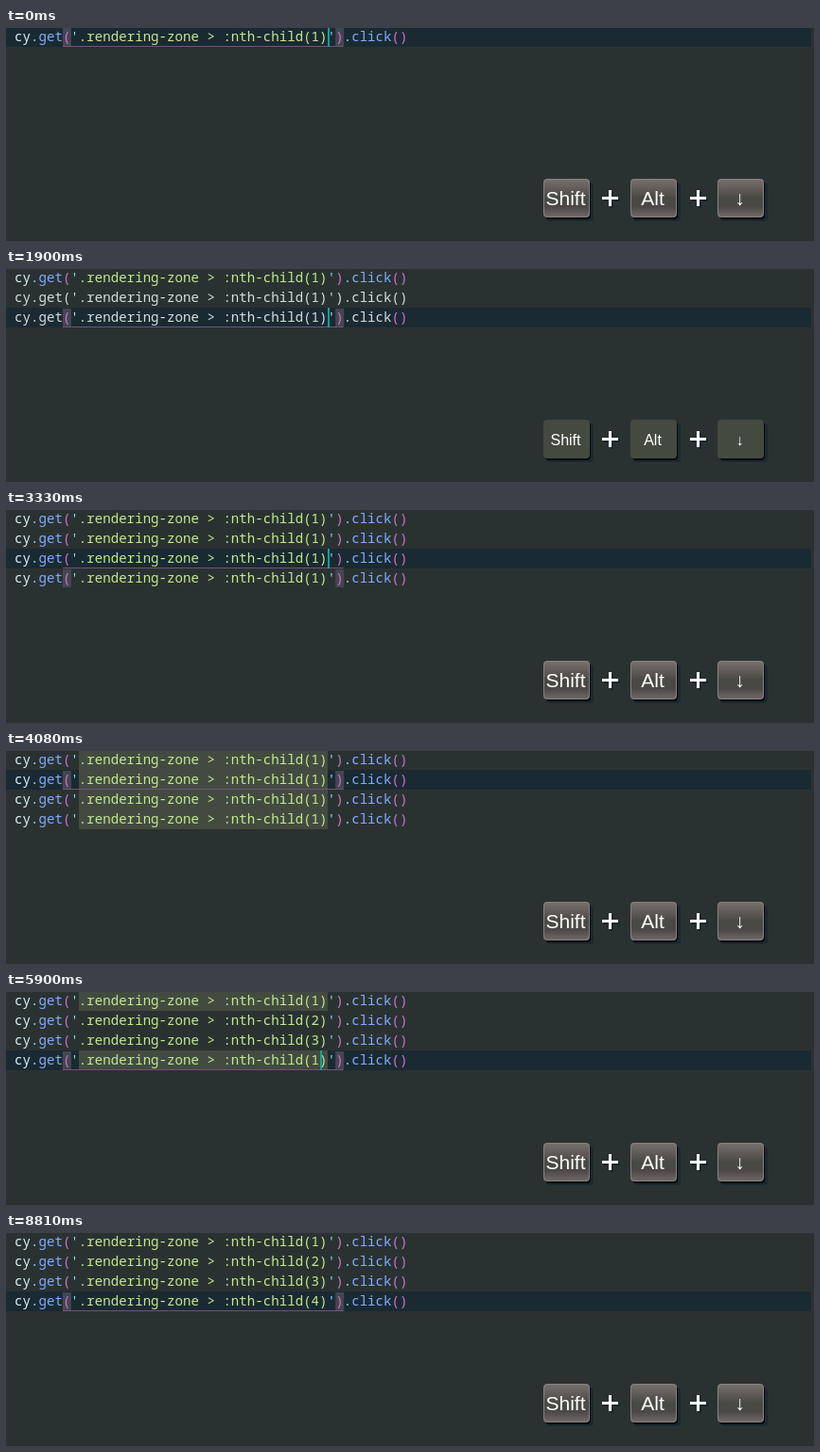
An HTML page with a canvas that plays this animation: 854 px wide and 226 px high, repeating every 9.34 s.

```html
<!DOCTYPE html>
<html lang="en">
<head>
<meta charset="utf-8">
<title>Copy line down</title>
<style>
  html, body { margin: 0; width: 100%; height: 100%; overflow: hidden; background: #2a3231; }
  canvas { display: block; }
</style>
</head>
<body>
<canvas id="stage" width="854" height="226"></canvas>
<script>
const ctx = document.getElementById('stage').getContext('2d');
const LOOP = 9340, LEFT = 9, CHAR = 8.48, ROW = 21;
const PLAIN = '#d3dee0', PINK = '#d16fd0';

// Each step changes part of the editor state.
const steps = [
  [0, { digits: ['1'], row: 0, col: 39, caret: true, match: 0, guide: 0,
        marks: [], plainFrom: 9, shift: false, alt: false, down: false }],
  [430, { shift: true, caret: false }],
  [530, { alt: true }],
  [890, { caret: true }],
  ...copyDown(1290, 1, 1480),
  ...copyDown(1870, 2, 1960),
  ...copyDown(2190, 3, 2340),
  [2500, { shift: false }],
  [2600, { alt: false }],
  [2700, { caret: false }],
  [2900, { caret: true }],
  [3330, { row: 2, guide: 2 }],
  [3360, { match: 2 }],
  [3580, { row: 1, guide: 1 }],
  [3610, { match: 1 }],
  [3980, { col: 38 }],
  [4080, { marks: [0, 1, 2, 3], caret: false }],
  ...retype(4380, 4580, ['1', '2', '1', '1'], 1),
  [4880, { row: 2 }],
  [4910, { match: 2, guide: 2 }],
  [5030, { marks: [0, 2, 3] }],
  ...retype(5160, 5390, ['1', '2', '3', '1'], 2),
  [5750, { row: 3 }],
  [5780, { match: 3, guide: 3 }],
  [5900, { marks: [0, 3] }],
  ...retype(6060, 6260, ['1', '2', '3', '4'], 3),
  ...[6760, 7290, 7520, 8050, 8810].map((t, i) => [t, { caret: i % 2 === 1 }])
];

function copyDown(t, row, release) {
  return [
    [t, { down: true, digits: Array(row + 1).fill('1'), row, guide: row, plainFrom: row - 1 }],
    [t + 30, { match: row }],
    [t + 60, { plainFrom: 9 }],
    [release, { down: false }]
  ];
}

function retype(erase, type, digits, row) {
  const erased = digits.map((d, i) => i === row ? '' : d);
  return [
    [erase, { digits: erased, col: 37, marks: [], caret: true }],
    [type, { digits, col: 38 }]
  ];
}

const colX = col => LEFT + col * CHAR;

function rect(color, x, y, w, h) {
  ctx.fillStyle = color;
  ctx.fillRect(x, y, w, h);
}

function drawCode(digit, row, plain, brackets) {
  const tokens = [
    ['cy', '#d9f1f5'], ['.', '#89ddff'], ['get', '#82aaff'], ['(', PINK], ["'", '#89ddff'],
    [`.rendering-zone > :nth-child(${digit})`, '#c3e88d'], ["'", '#89ddff'], [')', PINK],
    ['.', '#89ddff'], ['click', '#82aaff'], ['()', PINK]
  ];
  let col = 0;
  for (const [text, color] of tokens) {
    ctx.fillStyle = plain && !(brackets && color === PINK) ? PLAIN : color;
    ctx.fillText(text, colX(col), 14 + row * ROW);
    col += text.length;
  }
}

function drawEditor(s) {
  const top = row => row * ROW - 1;
  rect('#1a2a32', 0, top(s.row), 851, ROW);
  for (const row of s.marks) rect('#434b41', 77, top(row), 263, ROW);

  const close = 39 + s.digits[s.match].length;
  for (const col of [6, close]) rect('#454650', colX(col), top(s.match) + 1, 9, ROW - 2);
  const guideEnd = 40 + s.digits[s.guide].length;
  rect('#75517a', 60, top(s.guide) + 20, colX(guideEnd) - 60, 1);

  ctx.font = '14.13px "Noto Sans Mono", monospace';
  ctx.textAlign = 'left';
  s.digits.forEach((d, row) => drawCode(d, row, row >= s.plainFrom, row === s.row));
  if (s.caret) rect('#12a198', Math.round(colX(s.col) + 0.6), top(s.row), 2, ROW);
}

function box(color, x, y, w, h) {
  ctx.fillStyle = color;
  ctx.beginPath();
  ctx.roundRect(x, y, w, h, 4);
  ctx.fill();
}

function drawKey(label, x, pressed) {
  box('#1b2930', x + 3, 164, 50, 41);
  box('#070b0d', x + 2, 162, 48, 41);
  if (pressed) {
    box('#454a41', x, 160, 49, 41);
  } else {
    const face = ctx.createLinearGradient(0, 160, 0, 201);
    face.addColorStop(0, '#77706e');
    face.addColorStop(0.3, '#5d5856');
    face.addColorStop(0.5, '#474a42');
    face.addColorStop(0.72, '#4b4847');
    face.addColorStop(1, '#716b6a');
    box(face, x, 160, 49, 41);
    ctx.strokeStyle = '#8b8280';
    ctx.lineWidth = 1;
    ctx.beginPath();
    ctx.roundRect(x + 0.5, 160.5, 48, 40, 4);
    ctx.stroke();
  }
  ctx.font = `${pressed ? 16 : 21}px "Liberation Sans", Arial, sans-serif`;
  ctx.textAlign = 'center';
  ctx.fillStyle = '#fff';
  ctx.fillText(label, x + 23.5, pressed ? 187 : 188);
}

function drawPlus(x) {
  for (const [color, d] of [['#17262e', 2], ['#fff', 0]]) {
    rect(color, x - 8 + d, 179 + d, 17, 3);
    rect(color, x - 1 + d, 172 + d, 3, 17);
  }
}

function frame(now) {
  const t = now % LOOP;
  const state = Object.assign({}, ...steps.filter(([at]) => at <= t).map(([, change]) => change));
  rect('#2a3231', 0, 0, 854, 226);
  drawEditor(state);
  drawKey('Shift', 568, state.shift);
  drawPlus(638);
  drawKey('Alt', 660, state.alt);
  drawPlus(731);
  drawKey('↓', 752, state.down);
  requestAnimationFrame(frame);
}
requestAnimationFrame(frame);
</script>
</body>
</html>
```
